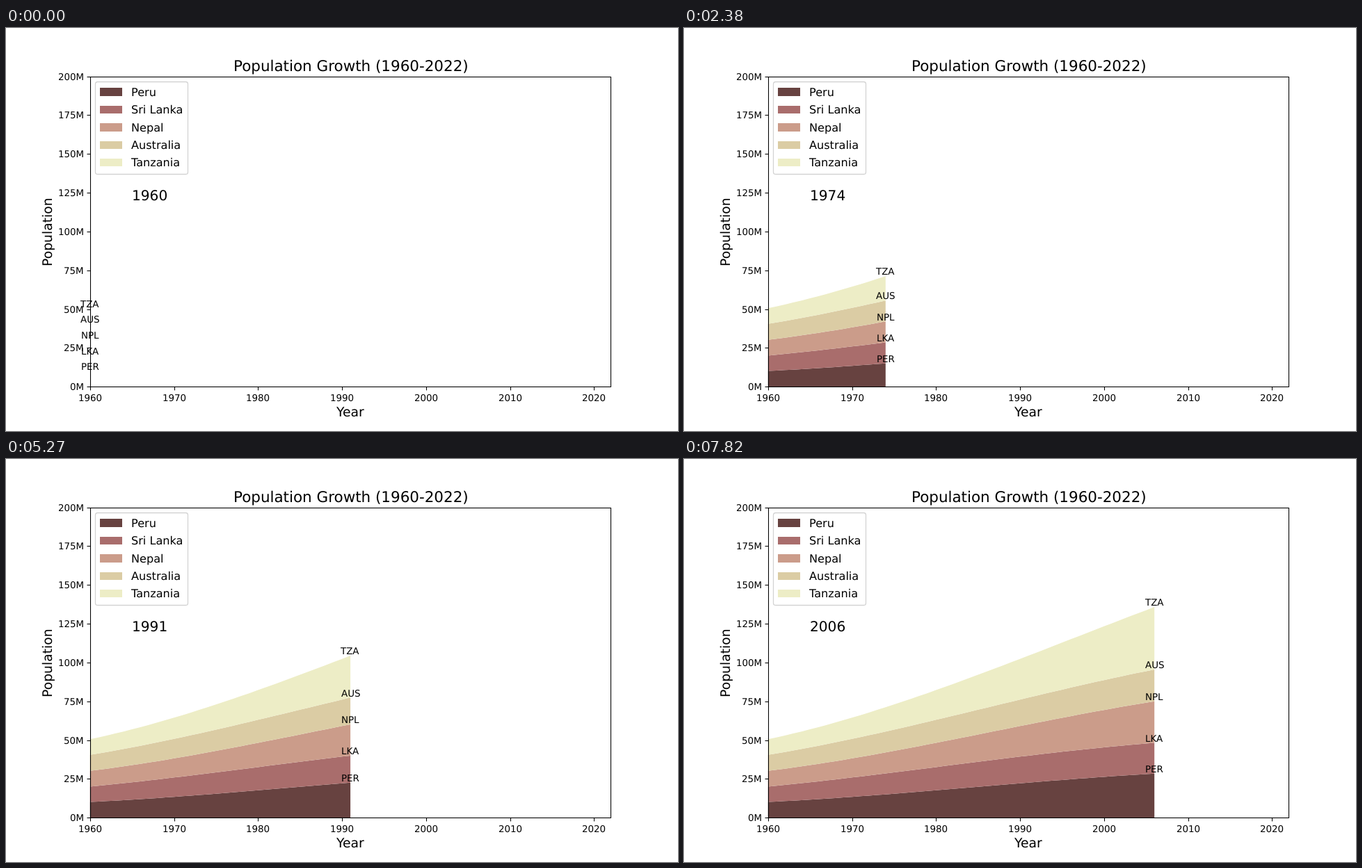
An HTML page with a canvas that plays this animation: 966 px wide and 580 px high, repeating every 7.99 s.

```html
<!DOCTYPE html>
<html lang="en">
<head>
<meta charset="utf-8">
<title>Population Growth</title>
<style>
html, body { margin: 0; width: 100%; height: 100%; overflow: hidden; background: #fff; }
canvas { display: block; }
</style>
</head>
<body>
<canvas id="stage" width="966" height="580"></canvas>
<script>
const ctx = document.getElementById('stage').getContext('2d');
const W = 966, H = 580, STEP = 170, STEPS = 47, FIRST = 1960;
const plot = { left: 120.75, right: 869.4, top: 69.6, bottom: 516.2 };

// key: millions in 1960, 1975, 1990 and 2005
const countries = [
  { name: 'Peru', code: 'PER', color: '#674240', key: [10.16, 15.45, 22.15, 28.05] },
  { name: 'Sri Lanka', code: 'LKA', color: '#a96d6c', key: [9.87, 13.75, 17.2, 19.75] },
  { name: 'Nepal', code: 'NPL', color: '#cb9c8a', key: [10.17, 13.85, 19.7, 26.3] },
  { name: 'Australia', code: 'AUS', color: '#dbcca4', key: [10.28, 13.7, 17.07, 20.3] },
  { name: 'Tanzania', code: 'TZA', color: '#ededc6', key: [10.05, 16.2, 26.2, 39.3] }
];

const px = year => plot.left + (year - FIRST) / 62 * (plot.right - plot.left);
const py = millions => plot.bottom - millions / 200 * (plot.bottom - plot.top);
const snap = v => Math.round(v) + 0.5;

// Cubic through four evenly spaced values
function population([a, b, c, d], year) {
  const s = (year - FIRST) / 15;
  return a + s * (b - a)
    + s * (s - 1) / 2 * (c - 2 * b + a)
    + s * (s - 1) * (s - 2) / 6 * (d - 3 * c + 3 * b - a);
}

// stacks[n][y] is the total of the first n countries in year FIRST + y
const stacks = [Array(STEPS).fill(0)];
countries.forEach((c, n) => {
  stacks.push(stacks[n].map((sum, y) => sum + population(c.key, FIRST + y)));
});

// align: 0 left, 0.5 centre, 1 right; the pen starts on a whole pixel
function text(str, x, y, pt, align = 0) {
  ctx.font = `${pt * 96.6 / 72}px "DejaVu Sans", sans-serif`;
  ctx.fillStyle = '#000';
  const width = ctx.measureText(str).actualBoundingBoxRight;
  ctx.fillText(str, Math.round(x - width * align), Math.round(y));
}

function line(x1, y1, x2, y2) {
  ctx.beginPath();
  ctx.moveTo(x1, y1);
  ctx.lineTo(x2, y2);
  ctx.stroke();
}

function drawAreas(last) {
  countries.forEach((c, n) => {
    ctx.beginPath();
    for (let y = 0; y <= last; y++) ctx.lineTo(px(FIRST + y), py(stacks[n + 1][y]));
    for (let y = last; y >= 0; y--) ctx.lineTo(px(FIRST + y), py(stacks[n][y]));
    ctx.fillStyle = c.color;
    ctx.fill();
  });
}

function drawAxes() {
  const left = snap(plot.left), right = snap(plot.right);
  const top = snap(plot.top), bottom = snap(plot.bottom);
  ctx.strokeStyle = '#000';
  ctx.lineWidth = 1.07;
  ctx.strokeRect(left, top, right - left, bottom - top);
  for (let year = FIRST; year <= 2020; year += 10) {
    const x = px(year);
    line(snap(x), bottom, snap(x), bottom + 5);
    text(year, x, 537, 10, 0.5);
  }
  for (let m = 0; m <= 200; m += 25) {
    const y = py(m);
    line(left - 5, snap(y), left, snap(y));
    text(m + 'M', 111.4, y + 5, 10, 1);
  }
  text('Population Growth (1960-2022)', 495, 62, 16, 0.5);
  text('Year', 495, 559, 14, 0.5);
  ctx.save();
  ctx.translate(66, 294);
  ctx.rotate(-Math.PI / 2);
  text('Population', 0, 0, 14, 0.5);
  ctx.restore();
}

function drawLegend() {
  ctx.beginPath();
  ctx.roundRect(128.5, 77.5, 133, 133, 3.2);
  ctx.fillStyle = '#fff';
  ctx.fill();
  ctx.strokeStyle = '#d3d3d3';
  ctx.lineWidth = 1.3;
  ctx.stroke();
  countries.forEach((c, i) => {
    const y = 86.35 + 25.45 * i;
    const top = Math.round(y), bottom = Math.round(y + 11.27);
    ctx.fillStyle = c.color;
    ctx.fillRect(135, top, 32, bottom - top);
    text(c.name, 180, bottom, 12);
  });
}

function draw(now) {
  const last = Math.floor(now / STEP) % STEPS;
  ctx.textRendering = 'geometricPrecision';
  ctx.fillStyle = '#fff';
  ctx.fillRect(0, 0, W, H);
  drawAreas(last);
  drawAxes();
  drawLegend();
  text(FIRST + last, px(1965), 248, 15);
  countries.forEach((c, n) => {
    text(c.code, px(FIRST + last), py(stacks[n + 1][last]) - 1.8, 10, 0.5);
  });
}

let start;
function loop(now) {
  start ??= now;
  draw(Math.max(0, now - start));
  requestAnimationFrame(loop);
}
draw(0);
requestAnimationFrame(loop);
</script>
</body>
</html>
```
